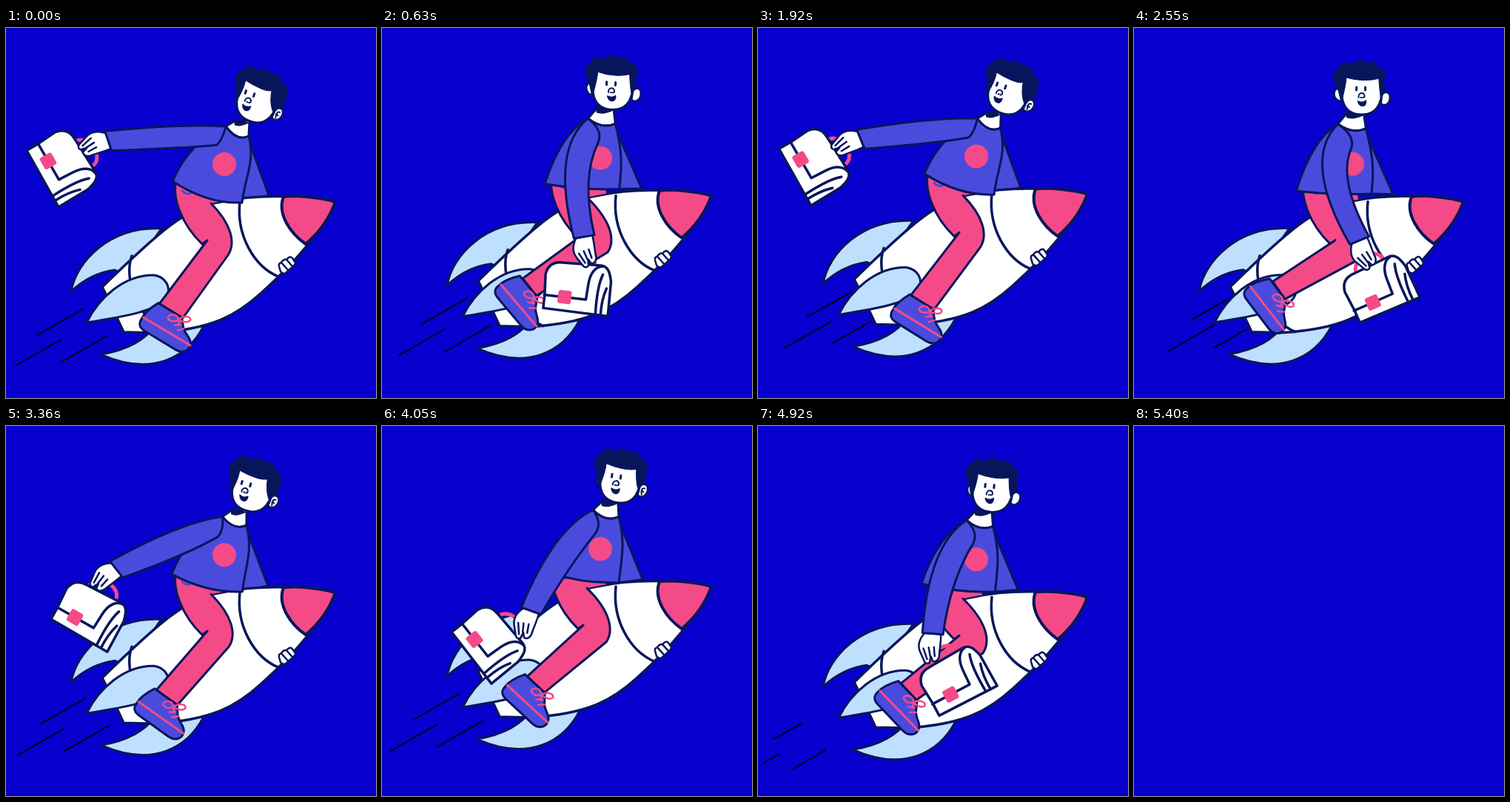
Recreate the animation shown at these times as an HTML page with a canvas. Size 500 by 500 pixels, loop 5430 ms.

```html
<!DOCTYPE html>
<html lang="en">
<head>
<meta charset="utf-8">
<title>Rocket ride</title>
<style>
html, body { margin: 0; width: 100%; height: 100%; overflow: hidden; background: #0800cf; }
canvas { display: block; }
</style>
</head>
<body>
<canvas id="stage" width="500" height="500"></canvas>
<script>
const ctx = document.getElementById('stage').getContext('2d');
const BG = '#0800cf', NAVY = '#07165c', BLUE = '#4a4bdd', PINK = '#f54a88', SKY = '#bfdfff', WHITE = '#fff';
const LOOP = 5430, SWING = 1800, BOB = 2660, GUST = 675, ARM = 160;

const mix = (a, b, w) => a + (b - a) * w;
const mid = (a, b) => [(a[0] + b[0]) / 2, (a[1] + b[1]) / 2];
const add = (a, x, y) => [a[0] + x, a[1] + y];
const rad = deg => deg * Math.PI / 180;
const polar = ([x, y], r, deg) => [x + r * Math.cos(rad(deg)), y + r * Math.sin(rad(deg))];

function smooth(from, to, u) {
  const s = Math.min(1, Math.max(0, (u - from) / (to - from)));
  return s * s * (3 - 2 * s);
}
// 1 = leaning back, 0 = swung to the front
const swing = (u, fall, fallEnd, rise, riseEnd) => 1 - smooth(fall, fallEnd, u) + smooth(rise, riseEnd, u);

function draw(d, fill, stroke = NAVY, width = 3) {
  const path = new Path2D(d);
  if (fill) { ctx.fillStyle = fill; ctx.fill(path); }
  if (stroke) { ctx.strokeStyle = stroke; ctx.lineWidth = width; ctx.stroke(path); }
}
const line = (d, color, width) => draw(d, null, color, width);

function at([x, y], deg, paint) {
  ctx.save();
  ctx.translate(x, y);
  ctx.rotate(rad(deg));
  paint();
  ctx.restore();
}

function getPose(t) {
  const u = t / SWING % 1;
  const w = swing(u, .02, .46, .59, .98);
  const pt = (x0, y0, x1, y1) => [mix(x0, x1, w), mix(y0, y1, w)];
  const collarL = pt(275, 130, 297, 133);
  const armDeg = mix(-13, 83, w);
  const cuff = polar(collarL, ARM, armDeg + 90);
  const cuffDeg = armDeg - 12;
  return {
    head: pt(306, 93, 337, 103), tilt: mix(0, 20, w),
    collarL, collarR: pt(313, 136, 328, 146),
    hemL: pt(219, 221, 225, 207), hemR: pt(321, 224, 319, 236),
    side: pt(241, 150, 249, 152), farHand: pt(350, 225, 355, 226),
    knee: pt(313, 293, 307, 288),
    ankleL: pt(187, 342, 207, 373), ankleR: pt(203, 366, 239, 392), shoeDeg: mix(52, 30, w),
    cuff, cuffDeg, cuffA: polar(cuff, -14, cuffDeg), cuffB: polar(cuff, 14, cuffDeg),
    outer: pt(226, 180, 240, 129), bend: pt(-31, -17, 36, 0), pit: pt(293, 165, 285, 158),
    bagDeg: mix(-36, 60, swing(u, .2, .48, .68, .98))
  };
}

// Each streak grows out of the tail, travels left and is cut off at its end
function streak(start, track, delay, p) {
  const front = start + delay - 155 * p;
  const l = Math.max(start - 105, front), r = Math.min(start, front + 62);
  if (r > l) line(`M${l} ${track - .57 * l}L${r} ${track - .57 * r}`, '#03031c', 2);
}
function speedLines(t) {
  const p = (.5 + t / GUST) % 1;
  streak(126, 439, -6, p);
  streak(113, 463.5, -23, p);
  streak(152, 494, 0, p);
}

function fins() {
  draw('M88 356C95 315 140 268 210 271L165 335L147 327C125 330 105 340 88 356Z', SKY);
  draw('M128 441C165 435 190 420 200 403L267 403C245 445 198 472 128 441Z', SKY);
}
function rocket() {
  draw('M445 235C400 226 340 224 290 235C245 241 205 277 130 350L137 364L159 411L200 412C280 407 312 388 345 358C385 322 425 278 445 235Z', WHITE, NAVY, 3.5);
  line('M170 308C158 340 180 395 218 411', NAVY, 3.5);
  line('M316 235C311 280 335 322 368 336', NAVY, 3.5);
  draw('M375 228C395 226 425 229 445 235C438 255 425 275 405 292C385 278 366 252 375 228Z', PINK, NAVY, 4);
  draw('M109 398C125 365 160 333 200 334C215 336 224 350 217 363C208 382 160 390 109 398Z', SKY);
  draw('M369 322Q368 318 372 317Q375 312 379 313Q384 307 387 311L391 317Q391 320 388 322L378 331Q374 333 371 329Z', WHITE, NAVY, 2.5);
  line('M372 317L381 327M379 313L387 322', NAVY, 2.5);
}

function drawLeg({ knee, ankleL, ankleR, shoeDeg }) {
  const back = 'M230 206C224 230 238 266 265 292';
  const shin = `L${ankleL}L${ankleR}L${add(knee, -7, 19)}C${add(knee, 4, 2)} ${add(knee, -3, -24)} 277 237`;
  draw(`${back}L272 287${shin}L303 232L300 212Z`, PINK, null);
  line(`${back}M272 287${shin}M265 292L272 287`);
  line('M238 220Q244 226 250 223Q253 220 254 214', BLUE);
  at(add(mid(ankleL, ankleR), -2, -1), shoeDeg, () => {
    draw('M-18 -1C-23 8 -28 20 -27 30C-27 40 -20 41 -14 41L34 42C45 42 50 34 48 27C46 18 34 18 28 11L19 0Z', BLUE);
    line('M-26 26L48 27', PINK);
    line('M17 5C10 -2 2 4 3 10C9 14 14 9 17 5C19 -3 28 -8 31 -3C31 2 24 5 17 5M17 5L21 11M16 14L23 9M23 18L29 12', PINK, 2.5);
  });
}

function drawTorso({ head: [x, y], tilt, collarL, collarR, hemL, hemR, side }) {
  const turn = -.6 * tilt, left = x - 20 + turn * .7, right = x + 4 + turn;
  const rim = `Q${mid(collarL, collarR)[0]} ${collarR[1] + 8} ${collarR}`;
  draw(`M${left} ${y + 23}L${collarL}${rim}L${right} ${y + 22}Z`, WHITE);
  draw(`M${left} ${y + 19}L${right} ${y + 25}Q${x - 10 + turn} ${y + 32} ${left} ${y + 28}Z`, NAVY, null);
  draw(`M${collarL}${rim}C${add(collarR, 9, 35)} ${add(hemR, 4, -35)} ${hemR}
    Q${mid(hemL, hemR)[0]} ${hemR[1] + 2} ${hemL}Q${side} ${collarL}Z`, BLUE);
  ctx.fillStyle = PINK;
  ctx.beginPath();
  ctx.arc(295, 184, 16, 0, 7);
  ctx.fill();
}

function drawHead({ head, tilt }) {
  const turn = -.6 * tilt;
  at(head, tilt, () => {
    draw(`M${-25 - turn} -9C${-40 - turn} -18 ${-41 - turn} 7 ${-26 - turn} 6Z`, WHITE, NAVY, 2.5);
    draw('M-25 -27C-30 5 -23 24 1 24C25 24 32 2 26 -27Z', WHITE);
    draw(`M-26 8C-29 3 -29 -6 -33 -14C-41 -26 -36 -39 -29 -38C-31 -46 -18 -49 -13 -42C-10 -50 3 -51 6 -45
      C14 -50 22 -46 22 -40C31 -40 36 -31 ${30 - turn * .5} -24C${33 - turn * .4} -14 ${30 - turn * .4} 0 ${28 - turn * .5} 7
      C${26 + turn * .3} 2 ${25 + turn * .7} -12 ${24 + turn * .8} -25C10 -21 -8 -22 ${-20 + turn * .3} -26C-21 -12 -25 0 -26 8Z`, NAVY, NAVY, 1);
    draw('M28 -1C30 -9 40 -8 39 2C38 10 31 13 27 9Z', WHITE, NAVY, 2.5);
    if (tilt > 8) line('M35 -1C30 -1 31 3 34 4M31 3L32 8', NAVY, 2);
    ctx.translate(turn, 0);
    line('M-6 -13L-6 -9M6 -13L6 -9', NAVY, 3);
    line('M-3 1C-4 -6 5 -7 5 -1C5 0 4 1 3 1M0 1L1 1', NAVY, 2);
    draw('M-4 6Q2 9 7 5C8 14 -1 15 -4 6Z', NAVY, NAVY, 1.5);
  });
}

// The bag hangs rigidly from the cuff and turns a little later than the arm
function drawBag({ cuff, bagDeg }) {
  at(cuff, bagDeg, () => {
    ctx.translate(-17, 84);
    line('M-5 -45C-3 -67 35 -68 36 -48', PINK, 5);
    draw('M-27 18L-27 0L-29 -28C-27 -42 -18 -46 -8 -46L44 -48C54 -48 57 -40 60 -28L61 19Z', WHITE, NAVY, 3.5);
    line('M-28 0L29 0L30 -22C31 -38 38 -46 46 -47M48 -36Q42 -20 44 18M55 -18Q50 -2 51 18', NAVY, 3.5);
    ctx.fillStyle = PINK;
    ctx.beginPath();
    ctx.roundRect(-9, -9, 18, 18, 3);
    ctx.fill();
  });
}

function drawArm({ collarL, cuff, cuffDeg, cuffA, cuffB, outer, bend, pit }) {
  at(cuff, cuffDeg, () => {
    draw('M-11 0C-17 8 -20 17 -15 26L-8 39C-4 43 0 40 -1 36L0 31L3 37C8 39 12 33 11 26C11 16 12 8 11 0Z', WHITE, NAVY, 2.5);
    line('M-11 21L-5 35M-4 19L-1 31M3 18L5 30', NAVY, 2.5);
  });
  const inner = add(mid(cuffB, pit), ...bend);
  draw(`M${collarL}Q${outer} ${cuffA}L${cuffB}Q${inner} ${pit}Q${pit[0] + 8} ${collarL[1] + 17} ${collarL}Z`, BLUE);
}

function render(t) {
  ctx.setTransform(1, 0, 0, 1, 0, 0);
  ctx.fillStyle = BG;
  ctx.fillRect(0, 0, 500, 500);
  if (t >= 5400) return;
  ctx.lineJoin = ctx.lineCap = 'round';
  ctx.translate(0, -9 * (1 - Math.cos(2 * Math.PI * t / BOB)));

  const pose = getPose(t);
  speedLines(t);
  fins();
  draw(`M${add(pose.collarR, 1, 8)}L${pose.farHand}L${pose.hemR}Z`, BLUE);
  rocket();
  drawLeg(pose);
  drawTorso(pose);
  drawHead(pose);
  drawBag(pose);
  drawArm(pose);
}

const start = performance.now();
function tick() {
  render((performance.now() - start) % LOOP);
  requestAnimationFrame(tick);
}
tick();
</script>
</body>
</html>
```
